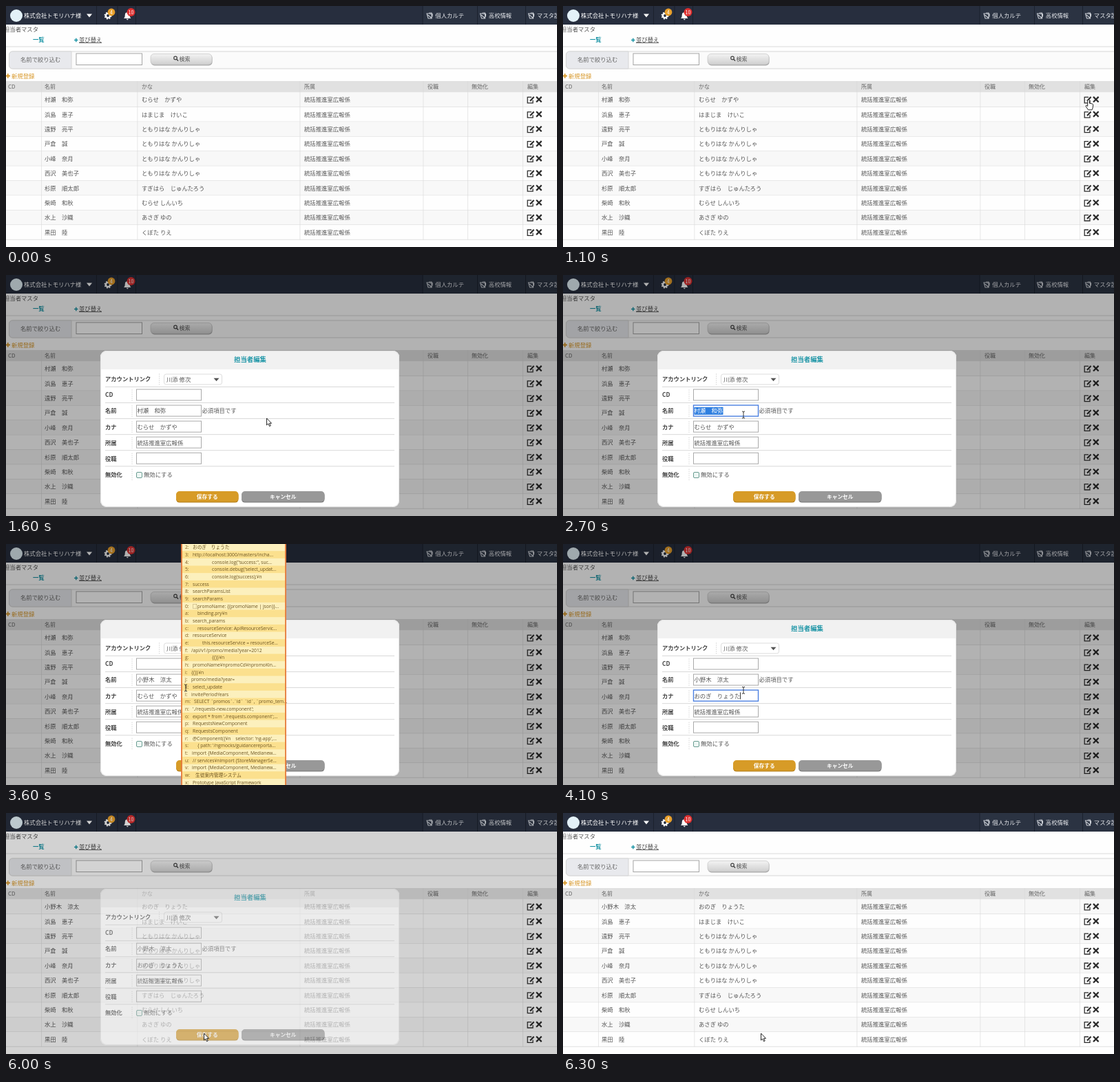
Animation of 800x350 px, one loop 7100 ms. Source, as an HTML page:

```html
<!DOCTYPE html>
<html lang="ja">
<head>
<meta charset="utf-8">
<title>担当者マスタ</title>
<style>
html, body { margin: 0; width: 100%; height: 100%; overflow: hidden; background: #fff; }
svg { display: block; width: 800px; height: 350px; }
text { white-space: pre; font-family: "Noto Sans CJK JP", "Noto Sans CJK", "Noto Sans", sans-serif; }
.code text { font-family: "Open Sans", "Noto Sans CJK JP", sans-serif; }
</style>
</head>
<body>
<svg id="stage" viewBox="0 0 800 350"></svg>
<script>
const LOOP = 7100, STEP = 100;
const stage = document.getElementById('stage');
const TEAL = '#1c95a6', ORANGE = '#d8982a', INK = '#555';

function add(parent, tag, attrs, text) {
  const el = document.createElementNS('http://www.w3.org/2000/svg', tag);
  for (const k in attrs) el.setAttribute(k, attrs[k]);
  if (text !== undefined) el.textContent = text;
  parent.appendChild(el);
  return el;
}
const group = (p, attrs = {}) => add(p, 'g', attrs);
const box = (p, x, y, w, h, fill, more = {}) =>
  add(p, 'rect', { x, y, width: w, height: h, fill, ...more });
const path = (p, d, more) => add(p, 'path', { d, fill: 'none', ...more });
// y is the middle of the line of text
const label = (p, x, y, text, fill = INK, size = 8.35, more = {}) =>
  add(p, 'text', { x, y: y + size * 0.37, fill, 'font-size': size, ...more }, text);
const bold = { 'font-weight': 700 };
const medium = { 'font-weight': 500 };
const mid = { 'text-anchor': 'middle' };
const show = (el, on) => el.setAttribute('visibility', on ? 'visible' : 'hidden');

function gradient(id, from, to) {
  const g = add(stage, 'linearGradient', { id, x1: 0, y1: 0, x2: 0, y2: 1 });
  add(g, 'stop', { offset: 0, 'stop-color': from });
  add(g, 'stop', { offset: 1, 'stop-color': to });
}
gradient('grey', '#f3f3f3', '#cfcfcf');

const OLD = ['村瀬　和弥', 'むらせ　かずや'];
const NEW = ['小野木　涼太', 'おのぎ　りょうた'];
const DEPT = '統括推進室広報係';
const ADMIN = 'ともりはな かんりしゃ';

// ---- page ----
const page = group(stage);
box(page, 0, 0, 800, 350, '#fefefe');

function drawHeader() {
  box(page, 0, 0, 800, 27, '#272e3e');
  box(page, 605, 0, 195, 27, '#2b3342');
  for (const x of [131, 161.5, 188, 604.5, 684, 754])
    box(page, x, 0, 1, 27, '#1b212d');
  add(page, 'circle', { cx: 15, cy: 14, r: 9, fill: '#e3f1f8' });
  label(page, 26, 13.5, '株式会社トモリハナ様', '#fff', 8.35, medium);
  path(page, 'M117 11.5h8l-4 5z', { fill: '#fff' });

  add(page, 'circle', { cx: 148, cy: 14, r: 3.1, fill: 'none', stroke: '#fff', 'stroke-width': 2.4 });
  add(page, 'circle', { cx: 148, cy: 14, r: 4.7, fill: 'none', stroke: '#fff', 'stroke-width': 1.6, 'stroke-dasharray': '1.9 1.8' });
  path(page, 'M171 18c2-1.5 1.5-4 2-6.500c.5-3 6-3 6.500 0c.5 2.500 0 5 2 6.500zM174.500 18.800h3.500l-1.700 1.600z', { fill: '#fff' });
  const badge = (x, r, fill, n) => {
    add(page, 'circle', { cx: x, cy: 9, r, fill });
    label(page, x, 9, n, '#fff', 7, mid);
  };
  badge(153, 5.4, '#e8a02c', '4');
  badge(181.5, 6, '#dd3030', '10');

  [[611, '個人カルテ'], [688.5, '高校情報'], [758.5, 'マスタ設定']].forEach(([x, t]) => {
    path(page, `M${x} 11h3l1-1h3v8h-5zM${x + 1.5} 13l6 5M${x + 4} 11.500h4v4`, { stroke: '#c9cdd4', 'stroke-width': 1.1 });
    label(page, x + 12.3, 13.5, t, '#e6e8ec');
  });
}

function drawTools() {
  label(page, -3, 34, '担当者マスタ');
  label(page, 39, 49, '一覧', TEAL, 8.35, bold);
  path(page, 'M99 49.500h5.500M101.750 46.700v5.600', { stroke: TEAL, 'stroke-width': 1.5 });
  label(page, 106, 49, '並び替え', '#444');
  box(page, 106, 53, 33, 0.8, '#444');
  box(page, 0, 58.5, 800, 1, '#dcdcdc');

  box(page, 4.5, 66, 805, 25, '#fbfbfb', { rx: 5, stroke: '#d6d6d6' });
  path(page, 'M95 66h-85.500a5 5 0 0 0-5 5v15a5 5 0 0 0 5 5h85.500z', { fill: '#e8e9ed', stroke: '#d6d6d6' });
  label(page, 21, 78, '名前で絞り込む', '#666');
  box(page, 102, 69, 95.5, 16.5, '#fff', { stroke: '#a5a5a5' });
  box(page, 210.500, 70.5, 89, 16, '#a8a8a8', { rx: 5 });
  box(page, 210, 69.5, 89, 15.5, 'url(#grey)', { rx: 5, stroke: '#c4c4c4', 'stroke-width': 0.7 });
  add(page, 'circle', { cx: 246, cy: 75.5, r: 2.3, fill: 'none', stroke: '#444', 'stroke-width': 1.2 });
  path(page, 'M247.700 77.300l2.300 2.400', { stroke: '#444', 'stroke-width': 1.5 });
  label(page, 251.5, 77.3, '検索', '#555', 8);

  path(page, 'M-.5 101.500h6.500M2.750 98.200v6.600', { stroke: ORANGE, 'stroke-width': 1.8 });
  label(page, 8, 102.3, '新規登録', ORANGE);
}

const PEOPLE = [
  OLD,
  ['浜島　恵子', 'はまじま　けいこ'],
  ['遠野　亮平', ADMIN],
  ['戸倉　誠', ADMIN],
  ['小峰　奈月', ADMIN],
  ['西沢　美也子', ADMIN],
  ['杉原　順太郎', 'すぎはら　じゅんたろう'],
  ['柴崎　和秋', 'むらせ しんいち'],
  ['水上　沙織', 'あさぎ ゆの'],
  ['黒田　陸', 'くぼた りえ']
];
const PITCH = 21.4, TOP = 125.5;
let firstRow;

function drawTable() {
  box(page, 0, 109, 800, 16.5, '#e1e1e1');
  const heads = { 3: 'CD', 56: '名前', 197: 'かな', 433: '所属', 612: '役職', 676: '無効化', 757: '編集' };
  for (const x in heads) label(page, x, 117.3, heads[x], '#666', 8);
  PEOPLE.forEach(([name, kana], i) => {
    const y = TOP + i * PITCH, c = y + 10.6;
    box(page, 0, y, 800, PITCH, i % 2 ? '#fefefe' : '#f8f8f8');
    box(page, 0, y + PITCH - 0.7, 800, 0.9, '#dedede');
    const cells = [label(page, 56, c, name), label(page, 197, c, kana)];
    if (!i) firstRow = cells;
    label(page, 433, c, DEPT);
    path(page, `M${763} ${c - 3.7}h-5.800v8.400h7.800v-4`, { stroke: '#2d2d2d', 'stroke-width': 1.3 });
    path(page, `M761 ${c + 1.8}l5.500-5.800`, { stroke: '#2d2d2d', 'stroke-width': 2.2 });
    path(page, `M770 ${c - 4.2}l7.600 7.600m0-7.600l-7.600 7.600`, { stroke: '#2a2a2a', 'stroke-width': 2.2 });
  });
  for (const x of [51, 190.5, 426.5, 605.5, 670, 750])
    box(page, x, 109, 0.8, TOP + 10 * PITCH - 109, '#d9d9d9', { opacity: 0.75 });
}

drawHeader();
drawTools();
drawTable();

// ---- dialog ----
const shade = box(stage, 0, 0, 800, 350, '#000');
const dialog = group(stage);
const rowY = i => 151.3 + i * 23.05;
const field = i => box(dialog, 189.5, rowY(i) - 8.3, 94, 16, '#fff', { stroke: '#a9a9a9' });

box(dialog, 137, 110, 434, 227, '#fff', { rx: 9 });
path(dialog, 'M137 137v-18a9 9 0 0 1 9-9h416a9 9 0 0 1 9 9v18z', { fill: '#f1f1f1' });
box(dialog, 137.5, 110.5, 433, 226, 'none', { rx: 9, stroke: '#e4e4e4' });
label(dialog, 354.5, 123, '担当者編集', TEAL, 9.4, { ...bold, ...mid });
['アカウントリンク', 'CD', '名前', 'カナ', '所属', '役職', '無効化'].forEach((t, i) => {
  const y = rowY(i);
  label(dialog, 144, y, t, '#444', 8.3, bold);
  const x = i ? 183 : 222.5;
  path(dialog, `M${x} ${y - 8}v17`, { stroke: '#ccc', 'stroke-width': 0.8, 'stroke-dasharray': '1.500 1.500' });
  if (i < 6) box(dialog, 144, y + 10.8, 420, 0.9, '#d4d4d4');
});
box(dialog, 229.500, 144, 84, 15, '#fff', { rx: 3, stroke: '#ddd' });
label(dialog, 233, 151.5, '川添 修次');
path(dialog, 'M301.500 149.800h8l-4 4.500z', { fill: '#555' });
field(1);
const nameField = field(2), kanaField = field(3);
field(4);
field(5);
const picked = box(dialog, 190.5, rowY(2) - 5.5, 42, 11, '#2f7fe0');
const nameText = label(dialog, 190.5, rowY(2), OLD[0]);
const kanaText = label(dialog, 190.5, rowY(3), OLD[1]);
const caret = box(dialog, 257, rowY(3) - 5, 0.9, 10, '#222');
label(dialog, 190.5, rowY(4), DEPT);
label(dialog, 284.5, rowY(2), '必須項目です');
box(dialog, 189.500, 286.500, 8, 8, '#eef7f4', { rx: 1.5, stroke: '#6a9c92' });
label(dialog, 200, rowY(6) + 0.4, '無効にする');

const button = (x, w, edge, fill, t) => {
  box(dialog, x, 315, w, 15.6, edge, { rx: 5 });
  return [box(dialog, x, 314, w, 15.2, fill, { rx: 5 }),
    label(dialog, x + w / 2, 321.8, t, '#fff', 7.7, { ...bold, ...mid })];
};
const [saveBox, saveText] = button(247, 90.5, '#b98420', '#d79b27', '保存する');
button(342, 120.5, '#7f7f7f', '#989898', 'キャンセル');

// ---- clipboard list: [indent, text] ----
const CLIPS = [
  [0, NEW[1]], [0, 'http://localhost:3000/masters/incha...'],
  [28, 'console.log("success:", suc...'], [28, "console.debug('select_updat..."],
  [28, 'console.log(success);¥n'], [0, 'success'], [0, 'searchParamsList'], [0, 'searchParams'],
  [0, '□promoName: {{promoName | json}}...'], [7, 'binding.pry¥n'], [0, 'search_params'],
  [7, 'resourceService: ApiResourceServic...'], [0, 'resourceService'],
  [14, 'this.resourceService = resourceSe...'], [-2, '/api/v1/promo/media?year=2012'],
  [28, '{{}}¥n'], [0, 'promoName¥npromoCd¥npromoKin...'], [-2, '{{}}¥n'],
  [-2, 'promo/media?year='], [0, 'select_update'], [-2, 'invitePeriodYears'],
  [2, 'SELECT `promos`.`id` `id`, `promo_tem...'], [0, "'./requests-new.component';"],
  [0, "export * from './requests.component';..."], [0, 'RequestsNewComponent'],
  [0, 'RequestsComponent'], [0, "@Component({¥n    selector: 'ng-app',..."],
  [7, "{ path: '/ngmocks/guidancereporta..."], [-1, 'import {MediaComponent, Medianew...'],
  [0, '// services¥nimport {StoreManagerSe...'], [-1, 'import {MediaComponent, Medianew...'],
  [4, '生徒案内管理システム'], [0, 'Prototype JavaScript Framework']
];
const KEYS = '234567890abcdefghijklmnopqrstuvwxyz';
const clips = group(stage, { class: 'code' });
box(clips, 255, -5, 151, 360, '#fcf0bd');
CLIPS.forEach(([indent, t], i) => {
  const y = 4.8 + i * 10.67;
  if (i % 2) box(clips, 255, y - 5.3, 151, 10.67, '#fbe08e');
  label(clips, 260, y, KEYS[i] + ':', '#7d5a1e', 6.7);
  label(clips, 271 + indent, y, t, '#6b5320', 6.7);
});
box(clips, 255, -5, 151, 360, 'none', { stroke: '#e5793a', 'stroke-width': 1.8 });

// ---- pointers ----
const pointers = {
  arrow: group(stage), hand: group(stage), beam: group(stage)
};
path(pointers.arrow, 'M.5 0v10l2.300-2.100l1.700 3.800l1.700-.8l-1.700-3.600h3z', { fill: '#fff', stroke: '#111', 'stroke-width': 0.9 });
path(pointers.hand, 'M-1.300 1.200c0-1.600 2.600-1.600 2.600 0v4l4 .8q1.500.4 1.400 2l-.6 4l-1 2.800h-5.600l-3.300-5c-.6-1.400.9-2 1.600-1.200l.9 1z', { fill: '#fff', stroke: '#111', 'stroke-width': 0.9 });
path(pointers.beam, 'M-2-5q2 0 2 1.200q0-1.200 2-1.200M0-4v8M-2 5q2 0 2-1.200q0 1.200 2 1.200', { stroke: '#222', 'stroke-width': 0.9 });

// [time, x, y]
const MOVES = [
  [100, 287, 320], [200, 330, 305], [400, 560, 215], [600, 735, 148], [700, 763, 136],
  [1200, 763, 136], [1300, 752, 142], [1400, 688, 153], [1500, 525, 185], [1600, 378, 208],
  [1700, 340, 205], [2000, 262, 203], [3000, 262, 203], [3200, 261, 209],
  [4000, 261, 209], [4200, 263, 216], [4500, 283, 285], [4700, 291, 317],
  [5900, 291, 317], [6000, 287, 320]
];
// [time, opacity]
const FADE = [
  [1200, 0], [1300, 0.1], [1400, 0.33], [1500, 0.72], [1600, 1],
  [5800, 1], [5900, 0.85], [6000, 0.58], [6100, 0.3], [6200, 0.1], [6300, 0]
];
const SHAPES = [
  [100, 'arrow'], [700, 'hand'], [1300, 'arrow'], [2000, 'beam'],
  [4300, 'arrow'], [4600, 'hand'], [6000, 'arrow']
];

function at(table, t) {
  const i = table.findIndex(r => r[0] > t);
  if (i === 0) return table[0].slice(1);
  if (i < 0) return table[table.length - 1].slice(1);
  const a = table[i - 1], b = table[i], k = (t - a[0]) / (b[0] - a[0]);
  return a.slice(1).map((v, n) => v + (b[n + 1] - v) * k);
}
const within = (t, a, b) => t >= a && t < b;

function focus(el, on) {
  el.setAttribute('stroke', on ? '#4a7fe0' : '#a9a9a9');
  el.setAttribute('stroke-width', on ? 1.4 : 1);
}

function draw(t) {
  const [fade] = at(FADE, t);
  shade.setAttribute('opacity', 0.3 * fade);
  dialog.setAttribute('opacity', fade);
  const row = t >= 6000 ? NEW : OLD;
  firstRow.forEach((el, i) => { el.textContent = row[i]; });

  const selected = within(t, 2300, 3000), list = within(t, 3400, 3900);
  picked.setAttribute('opacity', selected ? 1 : 0);
  nameText.setAttribute('fill', selected ? '#fff' : INK);
  nameText.textContent = t >= 3000 ? NEW[0] : OLD[0];
  kanaText.textContent = t >= 3900 ? NEW[1] : OLD[1];
  focus(nameField, within(t, 2100, 3300));
  focus(kanaField, within(t, 3300, 5300) && !list);
  caret.setAttribute('opacity', within(t, 3900, 5300) && (t - 3900) % 1000 < 500 || within(t, 4900, 5300) ? 1 : 0);
  show(clips, list);

  const hover = Math.max(0, Math.min(1, (t - 4600) / 300)) * (t < 5900);
  saveBox.setAttribute('fill', hover ? '#e2ab34' : '#d79b27');
  saveText.setAttribute('opacity', 1 - 0.75 * hover);

  const [x, y] = at(MOVES, t);
  const shape = SHAPES.filter(s => s[0] <= t).pop();
  for (const k in pointers) {
    show(pointers[k], shape && shape[1] === k);
    pointers[k].setAttribute('transform', `translate(${x} ${y})`);
  }
}

const start = performance.now();
function tick() {
  const t = (performance.now() - start) % LOOP;
  draw(Math.floor(t / STEP) * STEP);
  requestAnimationFrame(tick);
}
draw(0);
requestAnimationFrame(tick);
</script>
</body>
</html>
```
